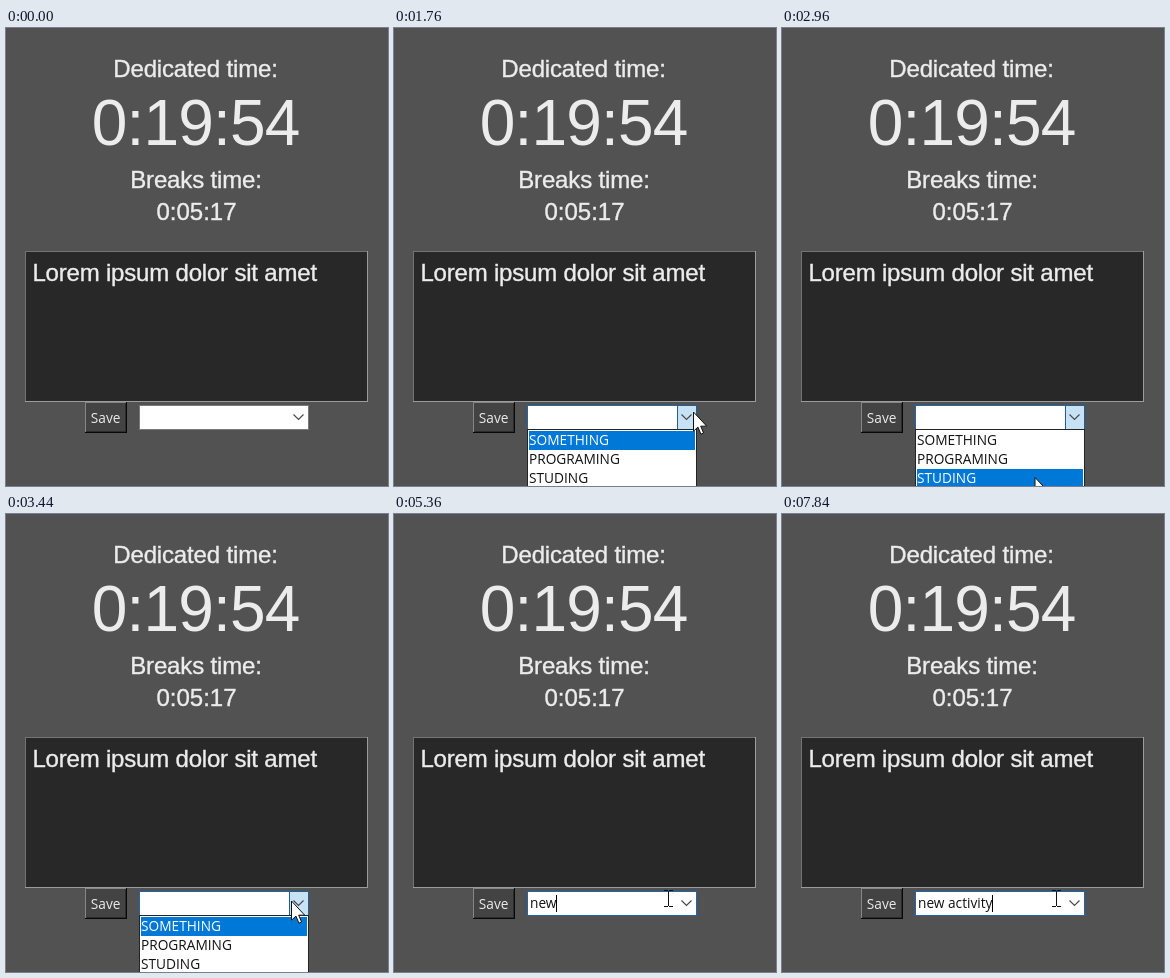
An HTML page with a canvas that plays this animation: 382 by 458 pixels, repeating every 8 s.

```html
<!DOCTYPE html>
<html lang="en">
<head>
<meta charset="utf-8">
<title>Time tracker</title>
<style>
  html, body { margin: 0; width: 100%; height: 100%; overflow: hidden; background: #525252; }
  canvas { display: block; }
</style>
</head>
<body>
<canvas id="stage" width="382" height="458"></canvas>
<script>
const ctx = document.getElementById('stage').getContext('2d');
const LOOP = 8000, STEP = 80;
const SANS = '"Liberation Sans", Arial, sans-serif';
const UI = '13.7px "Open Sans", "Noto Sans", sans-serif';
const LIGHT = '#ececec';
const ITEMS = ['SOMETHING', 'PROGRAMING', 'STUDING'];
const ROW_TOP = 403, ROW_H = 19;
const OPEN = 1520, CLOSE = 3920, HOVER = 1200, LEAVE = 4080, FOCUS = 3920;

// Pointer path: time, x, y
const PATH = [
  [880, 340, 417], [1360, 299.5, 384], [2080, 299.5, 384], [2400, 250, 455],
  [2640, 247, 461], [2800, 247, 461], [3440, 285.5, 387], [3600, 285.5, 387],
  [3760, 288, 390], [3920, 288, 390], [4560, 273.5, 384.5], [4960, 274.5, 384.5]
];

const PHRASE = 'new activity';
const KEYS = [5120, 5280, 5360, 5520, 5680, 5840, 6000, 6720, 6960, 7120, 7280, 7520];
const BLINK = 530;

function rect(x, y, w, h, color) {
  ctx.fillStyle = color;
  ctx.fillRect(x, y, w, h);
}

function text(str, x, y, font, color, align = 'left', spacing = 0) {
  ctx.font = font;
  ctx.textAlign = align;
  ctx.letterSpacing = spacing + 'px';
  ctx.fillStyle = color;
  ctx.fillText(str, x, y);
}

// Large label, slightly thickened
function label(str, x, y, align = 'center', spacing = -0.15) {
  text(str, x, y, '24px ' + SANS, LIGHT, align, spacing);
  ctx.strokeStyle = LIGHT;
  ctx.lineWidth = 0.4;
  ctx.strokeText(str, x, y);
}

function frame(x, y, w, h, topLeft, bottomRight = topLeft) {
  rect(x, y, w, 1, topLeft);
  rect(x, y, 1, h, topLeft);
  rect(x, y + h - 1, w, 1, bottomRight);
  rect(x + w - 1, y, 1, h, bottomRight);
}

function pointerAt(t) {
  if (t < PATH[0][0]) return null;
  const i = PATH.findIndex(p => p[0] > t);
  if (i < 0) return PATH[PATH.length - 1].slice(1);
  const [t0, x0, y0] = PATH[i - 1], [t1, x1, y1] = PATH[i];
  const u = (t - t0) / (t1 - t0), k = u * u * (3 - 2 * u);
  return [x0 + (x1 - x0) * k, y0 + (y1 - y0) * k];
}

function drawWindow() {
  rect(0, 0, 382, 458, '#525252');
  label('Dedicated time:', 189.5, 48.5);
  text('0:19:54', 189.7, 117, '64px ' + SANS, LIGHT, 'center', -0.8);
  label('Breaks time:', 190, 159.5);
  label('0:05:17', 190.5, 191.5, 'center', 0);

  rect(19, 223, 343, 151, '#282828');
  frame(19, 223, 343, 151, '#737373', '#9c9c9c');
  label('Lorem ipsum dolor sit amet', 26.4, 252.5, 'left', -0.19);

  rect(79, 374, 42, 31, '#434343');
  frame(80, 375, 40, 29, '#434343', '#2c2c2c');
  frame(79, 374, 42, 31, '#868686', '#080808');
  text('Save', 84.8, 394.5, UI, LIGHT);
}

function drawCombo(t) {
  const hot = t >= HOVER && t < LEAVE;
  rect(133, 377, 170, 25, '#fff');
  frame(133, 377, 170, 25, hot || t >= FOCUS ? '#1f66ad' : '#7a7a7a');
  if (hot) {
    rect(283, 377, 20, 25, '#c8e2f5');
    frame(283, 377, 20, 25, '#1f5f94');
  }
  ctx.strokeStyle = '#4a4a4a';
  ctx.lineWidth = 1.2;
  ctx.beginPath();
  ctx.moveTo(287.5, 386.5);
  ctx.lineTo(292.5, 391.5);
  ctx.lineTo(297.5, 386.5);
  ctx.stroke();
}

function drawEntry(t) {
  if (t < FOCUS) return;
  const count = KEYS.filter(k => k <= t).length;
  const typed = PHRASE.slice(0, count);
  text(typed, 136, 394, UI, '#111');
  const since = t - (count ? KEYS[count - 1] : FOCUS + 480);
  if (since >= 0 && Math.floor(since / BLINK) % 2 === 0) {
    rect(136 + Math.round(ctx.measureText(typed).width), 381, 1, 17, '#000');
  }
}

function drawList(pointerY) {
  const picked = Math.max(0, Math.min(2, Math.floor((pointerY - ROW_TOP) / ROW_H)));
  rect(133, 402, 170, 56, '#fff');
  frame(133, 401, 170, 60, '#242424');
  ITEMS.forEach((item, i) => {
    const y = ROW_TOP + i * ROW_H;
    if (i === picked) rect(135, y, 166, ROW_H, '#0078d7');
    text(item, 135, y + 14, UI, i === picked ? '#fff' : '#111');
  });
}

function drawArrow(x, y) {
  const shape = [[0, 0], [0, 16], [3.7, 12.6], [6.2, 18.5], [8.4, 17.5], [6, 11.8], [11, 11.8]];
  ctx.beginPath();
  shape.forEach(([px, py]) => ctx.lineTo(x + px * 1.2, y + py * 1.2));
  ctx.closePath();
  ctx.fillStyle = '#fff';
  ctx.fill();
  ctx.strokeStyle = '#111';
  ctx.lineWidth = 1;
  ctx.stroke();
}

function drawBeam(x, y) {
  const cx = Math.floor(x), top = Math.floor(y) - 8;
  rect(cx, top + 1, 1, 15, '#111');
  for (const sy of [top, top + 16]) {
    rect(cx - 4, sy, 4, 1, '#111');
    rect(cx + 1, sy, 4, 1, '#111');
  }
}

function draw(t) {
  const pointer = pointerAt(t);
  drawWindow();
  drawCombo(t);
  drawEntry(t);
  if (t >= OPEN && t < CLOSE) drawList(pointer[1]);
  if (!pointer) return;
  const overEntry = t >= CLOSE && pointer[0] < 283;
  (overEntry ? drawBeam : drawArrow)(...pointer);
}

const start = performance.now();
function tick() {
  const t = (performance.now() - start) % LOOP;
  draw(Math.floor(t / STEP) * STEP);
  requestAnimationFrame(tick);
}
tick();
</script>
</body>
</html>
```
